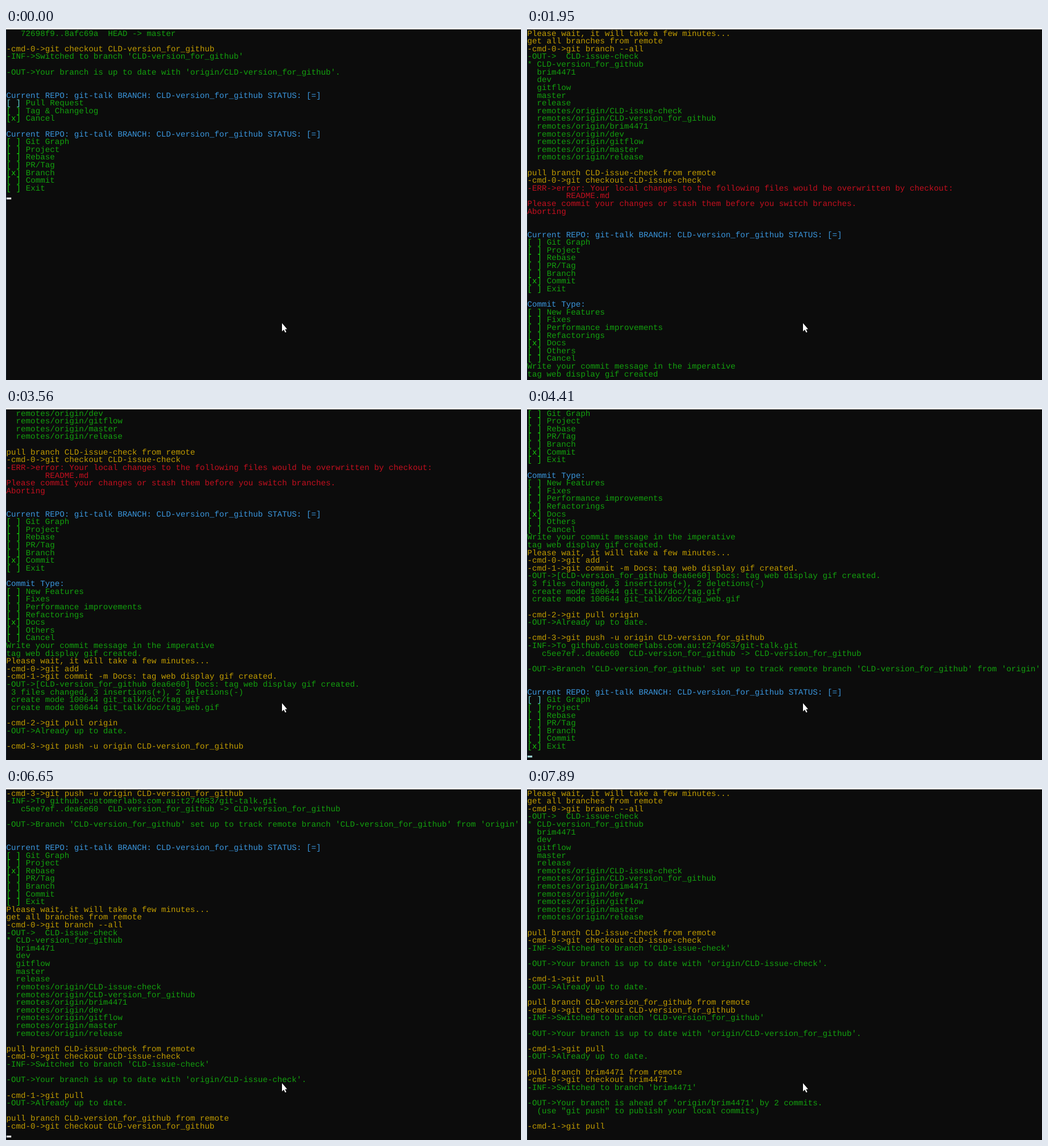
Animation of 905 by 619 pixels, one loop 8000 ms. Source, as an HTML page with a canvas:

```html
<!DOCTYPE html>
<html lang="en">
<head>
<meta charset="utf-8">
<title>Terminal session</title>
<style>
html, body { margin: 0; width: 100%; height: 100%; overflow: hidden; background: #0c0c0c; }
canvas { display: block; }
</style>
</head>
<body>
<canvas id="stage" width="905" height="619"></canvas>
<script>
const ctx = document.getElementById('stage').getContext('2d');
const LOOP = 8000, TICK = 75, ROWS = 45;
const CELL = 8.51, PITCH = 13.614, LEFT = 0.6, BASE = 13.6;
const GREEN = '#13a10e', YELLOW = '#c19c00', BLUE = '#3a96dd', RED = '#c50f1f';
const MARK = '#16c60c', CYAN = '#61d6d6', WHITE = '#f2f2f2', PALE = '#a5dcdc';

// Terminal actions: each one changes the screen state
const print = (...lines) => screen => screen.lines.push(...lines);
const type = text => screen => { screen.typed = text; };
const enter = screen => { screen.lines.push(screen.typed); screen.typed = ''; };
const blink = screen => { screen.cursor = !screen.cursor; };
const choose = label => screen => { screen.menu.choice = label; };
const ask = (title, ...labels) => screen => {
  const menu = screen.menu = { first: labels[0], last: labels.at(-1), choice: labels.at(-1) };
  screen.lines.push(title, ...labels.map(label => ({ label, menu })));
};

// Each group of actions is one tick after the group before it
const timeline = [];
function at(time, ...groups) {
  groups.forEach((actions, i) => timeline.push({ time: time + i * TICK, actions }));
}

const MAIN = 'CLD-version_for_github', ISSUE = 'CLD-issue-check', USER = 'brim4471';
const STATUS = `Current REPO: git-talk BRANCH: ${MAIN} STATUS: [=]`;
const WAIT = 'Please wait, it will take a few minutes...';
const PULL = '-cmd-1->git pull';
const UP_TO_DATE = ['-OUT->Already up to date.', ''];
const branches = [ISSUE, MAIN, USER, 'dev', 'gitflow', 'master', 'release'];

const askMain = ask(STATUS, 'Git Graph', 'Project', 'Rebase', 'PR/Tag', 'Branch', 'Commit', 'Exit');
const checkout = name => print(`pull branch ${name} from remote`, '-cmd-0->git checkout ' + name);
const switched = name => print(`-INF->Switched to branch '${name}'`, '');
const tracking = name => print(`-OUT->Your branch is up to date with 'origin/${name}'.`, '');
const fetchAll = print('get all branches from remote', '-cmd-0->git branch --all');
const listAll = print(
  '-OUT->  ' + ISSUE, '* ' + MAIN,
  ...branches.slice(2).map(b => '  ' + b),
  ...branches.map(b => '  remotes/origin/' + b), ''
);

at(0, [
  print('   72698f9..8afc69a  HEAD -> master', '', '-cmd-0->git checkout ' + MAIN),
  switched(MAIN), tracking(MAIN), print(''),
  ask(STATUS, 'Pull Request', 'Tag & Changelog', 'Cancel'), print(''),
  askMain, choose('Branch')
]);
at(470, [choose('PR/Tag')]);
at(620, [choose('Rebase')], [print(WAIT)], [fetchAll]);
at(1250,
  [listAll, checkout(ISSUE)],
  [print(
    '-ERR->error: Your local changes to the following files would be overwritten by checkout:',
    '        README.md',
    'Please commit your changes or stash them before you switch branches.',
    'Aborting', '', ''
  ), askMain],
  [choose('Commit'), print(''),
    ask('Commit Type:', 'New Features', 'Fixes', 'Performance improvements', 'Refactorings', 'Docs', 'Others', 'Cancel'),
    choose('Docs')],
  [print('Write your commit message in the imperative'), type('tag web disp')],
  [type('tag web display gif created')]
);
at(1950, [blink]);
at(2260, [blink, type('tag web display gif created.'), enter, print(WAIT)], [print('-cmd-0->git add .')]);
at(2560,
  [blink, print('-cmd-1->git commit -m Docs: tag web display gif created.')],
  [print(
    `-OUT->[${MAIN} dea6e60] Docs: tag web display gif created.`,
    ' 3 files changed, 3 insertions(+), 2 deletions(-)',
    ' create mode 100644 git_talk/doc/tag.gif',
    ' create mode 100644 git_talk/doc/tag_web.gif', '',
    '-cmd-2->git pull origin'
  )]
);
at(2870, [blink]);
at(3410, [print(UP_TO_DATE[0])], [print('')], [blink, print('-cmd-3->git push -u origin ' + MAIN)]);
at(4110, [blink, print(
  '-INF->To github.customerlabs.com.au:t274053/git-talk.git',
  `   c5ee7ef..dea6e60  ${MAIN} -> ${MAIN}`, '',
  `-OUT->Branch '${MAIN}' set up to track remote branch '${MAIN}' from 'origin'`, '', ''
)]);
at(4260, [blink]);
at(4410, [blink, askMain]);
at(4640, [blink]);
at(4790, [blink, choose('Commit')], [choose('PR/Tag')]);
at(5100, [choose('Rebase')]);
at(5330, [print(WAIT), fetchAll]);
at(5860, [listAll, checkout(ISSUE)]);
at(6340, [blink, switched(ISSUE), tracking(ISSUE), print(PULL)]);
at(6570,
  [print(...UP_TO_DATE)],
  [blink, checkout(MAIN)],
  [switched(MAIN), tracking(MAIN), print(PULL)]
);
at(7130, [blink]);
at(7280, [blink, print(...UP_TO_DATE), checkout(USER)]);
at(7890, [blink, switched(USER), print(
  `-OUT->Your branch is ahead of 'origin/${USER}' by 2 commits.`,
  '  (use "git push" to publish your local commits)', '', PULL
)]);

function screenAt(t) {
  const screen = { lines: [], typed: '', cursor: true, menu: null };
  for (const { time, actions } of timeline) {
    if (time <= t) actions.forEach(act => act(screen));
  }
  return screen;
}

function colorOf(line) {
  if (/^(Current|Commit Type)/.test(line)) return BLUE;
  if (/^(-ERR|Please commit|Aborting| +README)/.test(line)) return RED;
  if (/^(-cmd|Please wait|get all|pull branch)/.test(line)) return YELLOW;
  return GREEN;
}

// A menu nobody has touched yet keeps its last item chosen
const isFresh = menu => menu.choice === menu.last;

function text(s, col, y, color) {
  ctx.fillStyle = color;
  ctx.fillText(s, LEFT + col * CELL, y);
}

function drawLine(line, y) {
  if (typeof line === 'string') return text(line, 0, y, colorOf(line));
  const { label, menu } = line;
  const lit = isFresh(menu) && label === menu.first;
  text(label === menu.choice ? '[x]' : '[ ]', 0, y, lit ? CYAN : MARK);
  text(label, 4, y, GREEN);
}

function drawPointer() {
  ctx.beginPath();
  [[485, 519], [485, 533.4], [488.2, 530.4], [490.5, 535.6], [492.6, 534.7], [490.3, 529.7], [494, 529.4]]
    .forEach(([x, y]) => ctx.lineTo(x, y));
  ctx.closePath();
  ctx.strokeStyle = '#000';
  ctx.stroke();
  ctx.fillStyle = '#fff';
  ctx.fill();
}

function draw(t) {
  const { lines, typed, cursor } = screenAt(t);
  const top = Math.max(0, lines.length - ROWS + 1);
  const y = i => BASE + (i - top) * PITCH;
  const end = lines.length;

  ctx.fillStyle = '#0c0c0c';
  ctx.fillRect(0, 0, 905, 619);
  ctx.fillStyle = '#14222e';
  ctx.fillRect(0, 2, 1, 617);
  ctx.fillStyle = '#fff';
  ctx.fillRect(0, 0, 905, 2.4);

  for (let i = top; i < end; i++) drawLine(lines[i], y(i));
  drawLine(typed, y(end));
  if (cursor) {
    const menu = lines[end - 1].menu;
    ctx.fillStyle = menu && isFresh(menu) ? PALE : WHITE;
    ctx.fillRect(1 + typed.length * CELL, y(end) - 1.3, 8.2, 3.2);
  }
  drawPointer();
}

ctx.font = '14.18px "Liberation Mono", monospace';
ctx.textRendering = 'geometricPrecision';

const began = performance.now();
function frame() {
  draw((performance.now() - began) % LOOP);
  requestAnimationFrame(frame);
}
frame();
</script>
</body>
</html>
```
